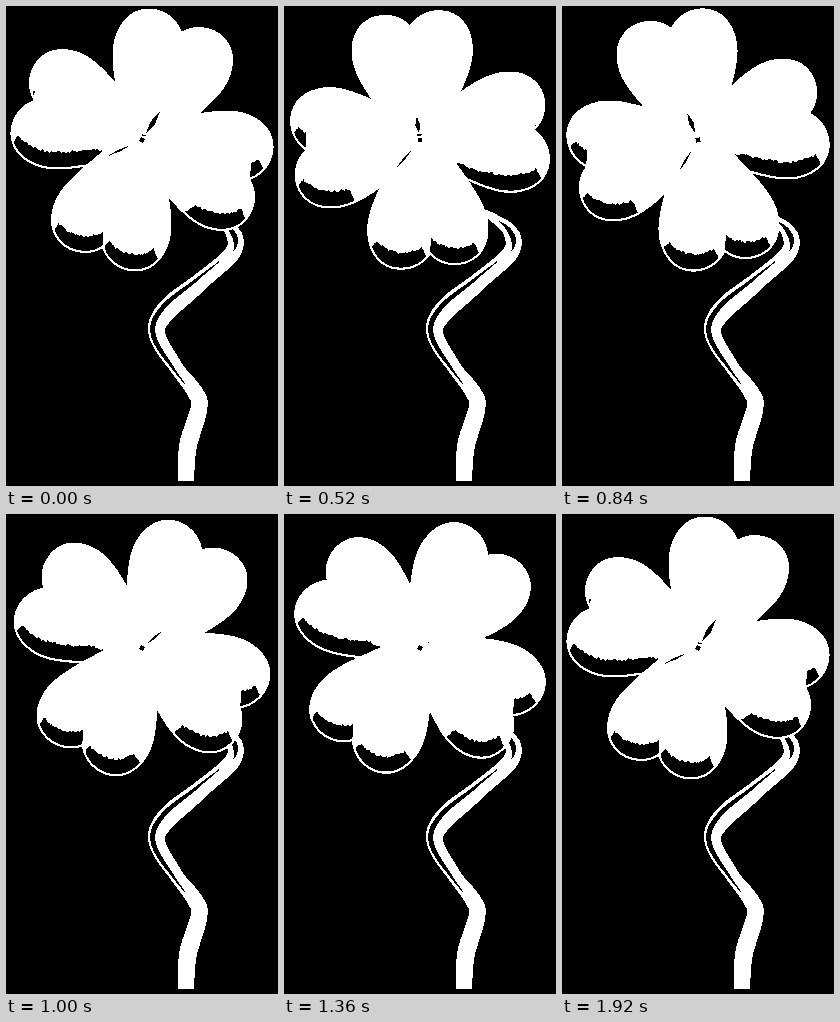
These frames come from a looping animation (272 by 480 pixels, 1.96 s). An HTML page with a canvas:

```html
<!DOCTYPE html>
<html lang="en">
<head>
<meta charset="utf-8">
<title>Spinning clover</title>
<style>
  html, body { margin: 0; width: 100%; height: 100%; overflow: hidden; background: #000; }
  canvas { display: block; width: 272px; height: 480px; }
</style>
</head>
<body>
<canvas id="stage" width="272" height="480"></canvas>
<script>
const W = 272, H = 480, CX = 136, CY = 134;
const STEP = 40, STEPS = 49, START = 20.1;
const ctx = document.getElementById('stage').getContext('2d', { willReadFrequently: true });
const rad = d => d * Math.PI / 180;
const clamp = x => Math.max(0, Math.min(1, x));
const bump = (x, mid, spread) => Math.exp(-(((x - mid) / spread) ** 2));

function bezier(a, b, c, d, n) {
  return Array.from({ length: n }, (_, i) => {
    const t = i / n, s = 1 - t;
    return [0, 1].map(j => s * s * s * a[j] + 3 * s * s * t * b[j] + 3 * s * t * t * c[j] + t * t * t * d[j]);
  });
}

// Curve through the given points, Catmull-Rom as Bezier pieces
function through(pts, n) {
  return pts.slice(0, -1).flatMap((p, i) => {
    const q = pts[i + 1], before = pts[i - 1] || p, after = pts[i + 2] || q;
    const b = p.map((x, j) => x + (q[j] - before[j]) / 6);
    const c = q.map((x, j) => x - (after[j] - p[j]) / 6);
    return bezier(p, b, c, q, n);
  }).concat([pts[pts.length - 1]]);
}

function shape(pts) {
  const p = new Path2D();
  pts.forEach(([x, y]) => p.lineTo(x, y));
  p.closePath();
  return p;
}

function fill(path, color) {
  ctx.fillStyle = color;
  ctx.fill(path);
}

// Unit normal at point i of a line
function normal(a, b) {
  const len = Math.hypot(b[0] - a[0], b[1] - a[1]) || 1;
  return [(a[1] - b[1]) / len, (b[0] - a[0]) / len];
}

// Heart outline as [along the leaf axis, across it]
const half = bezier([115, 0], [136, 16], [133, 60], [90, 60.5], 60)
  .concat(bezier([90, 60.5], [64, 60.5], [40, 40], [0, 20], 50)).reverse();
const heart = half.concat(half.slice().reverse().map(([u, v]) => [u, -v]));

// Stem: a centre line with a changing half width
const spine = through([[200, 206], [225, 224], [227, 246], [194, 276], [160, 305], [151, 328],
  [170, 361], [189, 386], [193, 402], [182, 440], [180, 475]], 14);
const girth = y => 8 * clamp(0.4 + (y - 206) / 40) + 2.5 * bump(y, 298, 22) - 1.2 * bump(y, 365, 14) + bump(y, 430, 30);

function ribbon(y0, y1, offset, width) {
  const left = [], right = [];
  spine.forEach(([x, y], i) => {
    if (y < y0 || y > y1) return;
    const [nx, ny] = normal(spine[Math.max(0, i - 1)], spine[Math.min(spine.length - 1, i + 1)]);
    const mid = offset * girth(y), w = width(y, (y - y0) / (y1 - y0));
    left.push([x + nx * (mid + w), y + ny * (mid + w)]);
    right.unshift([x + nx * (mid - w), y + ny * (mid - w)]);
  });
  return shape(left.concat(right));
}

const stem = ribbon(0, H, 0, girth);
const stemShade = ribbon(258, 377, 0.45, (y, s) => 0.4 + 2.2 * Math.sin(Math.PI * s));
const stemTop = ribbon(214, 246, 0, (y, s) => 2.6 * Math.sin(Math.PI * s));

function ripple(i) {
  const s = Math.sin(i * 91.7) * 437.5;
  return (s - Math.floor(s) - 0.5) * 3;
}

// Dark reflection along the edges that face down, wider round the lobes
function shade(pts) {
  const n = pts.length, p = new Path2D();
  const inner = pts.map(([x, y], i) => {
    const [nx, ny] = normal(pts[(i + n - 1) % n], pts[(i + 1) % n]);
    const r = Math.hypot(x - CX, y - CY), lobe = clamp((r - 85) / 30);
    const k = clamp((ny - 0.7 + 0.35 * lobe) / 0.28) *
      clamp((0.35 + 0.4 * lobe - nx) / 0.2) * clamp((r - 12) / 40);
    return [x + k, y - k * (17 + ripple(i))];
  });
  for (let i = 0; i < n; i++) {
    const j = (i + 1) % n;
    p.moveTo(...pts[i]);
    p.lineTo(...pts[j]);
    p.lineTo(...inner[j]);
    p.lineTo(...inner[i]);
    p.closePath();
  }
  return p;
}

function leaf(deg) {
  const s = Math.sin(rad(deg)), c = Math.cos(rad(deg));
  const pts = heart.map(([u, v]) => [CX + u * s + v * c, CY - u * c + v * s]);
  const path = shape(pts);
  fill(path, '#fff');
  ctx.save();
  ctx.clip(path);
  fill(shade(pts), '#000');
  ctx.strokeStyle = '#fff';
  ctx.lineWidth = 4;
  ctx.stroke(path);
  ctx.restore();
}

function ray(deg, r0, r1, width) {
  const s = Math.sin(rad(deg)), c = Math.cos(rad(deg)), m = (r0 + r1) / 2;
  const at = (r, v) => [CX + r * s + v * c, CY - r * c + v * s];
  fill(shape([at(r0, 0), at(m, -width / 2), at(r1, 0), at(m, width / 2)]), '#000');
}

// Small dark creases around the middle
function creases(turn) {
  const top = ((turn + 45) % 90 + 90) % 90 - 45;
  const size = clamp((38 - Math.abs(top)) / 12);
  if (size) ray(top * 1.6, 7, 7 + size * (13 + Math.abs(top) * 0.7), 5 * size);
  const seam = top + 225;
  if (seam > 208 && seam < 250) ray(seam, 12, 38, 2.2);
}

// Pure black and white, no soft edges
function harden() {
  const img = ctx.getImageData(0, 0, W, H), d = img.data;
  for (let i = 0; i < d.length; i += 4) d[i] = d[i + 1] = d[i + 2] = d[i] > 127 ? 255 : 0;
  ctx.putImageData(img, 0, 0);
}

function draw(step) {
  const u = step / (STEPS - 1);
  const turn = START + 360 * u * u * (3 - 2 * u);
  ctx.fillStyle = '#000';
  ctx.fillRect(0, 0, W, H);
  fill(stem, '#fff');
  fill(stemShade, '#000');
  fill(stemTop, '#000');
  [0, 90, 180, 270].map(a => a + turn)
    .sort((a, b) => Math.cos(rad(b)) - Math.cos(rad(a)))
    .forEach(leaf);
  creases(turn);
  harden();
}

const begin = performance.now();
let shown = -1;
function tick() {
  const step = Math.floor((performance.now() - begin) / STEP) % STEPS;
  if (step !== shown) draw(shown = step);
  requestAnimationFrame(tick);
}
tick();
</script>
</body>
</html>
```
